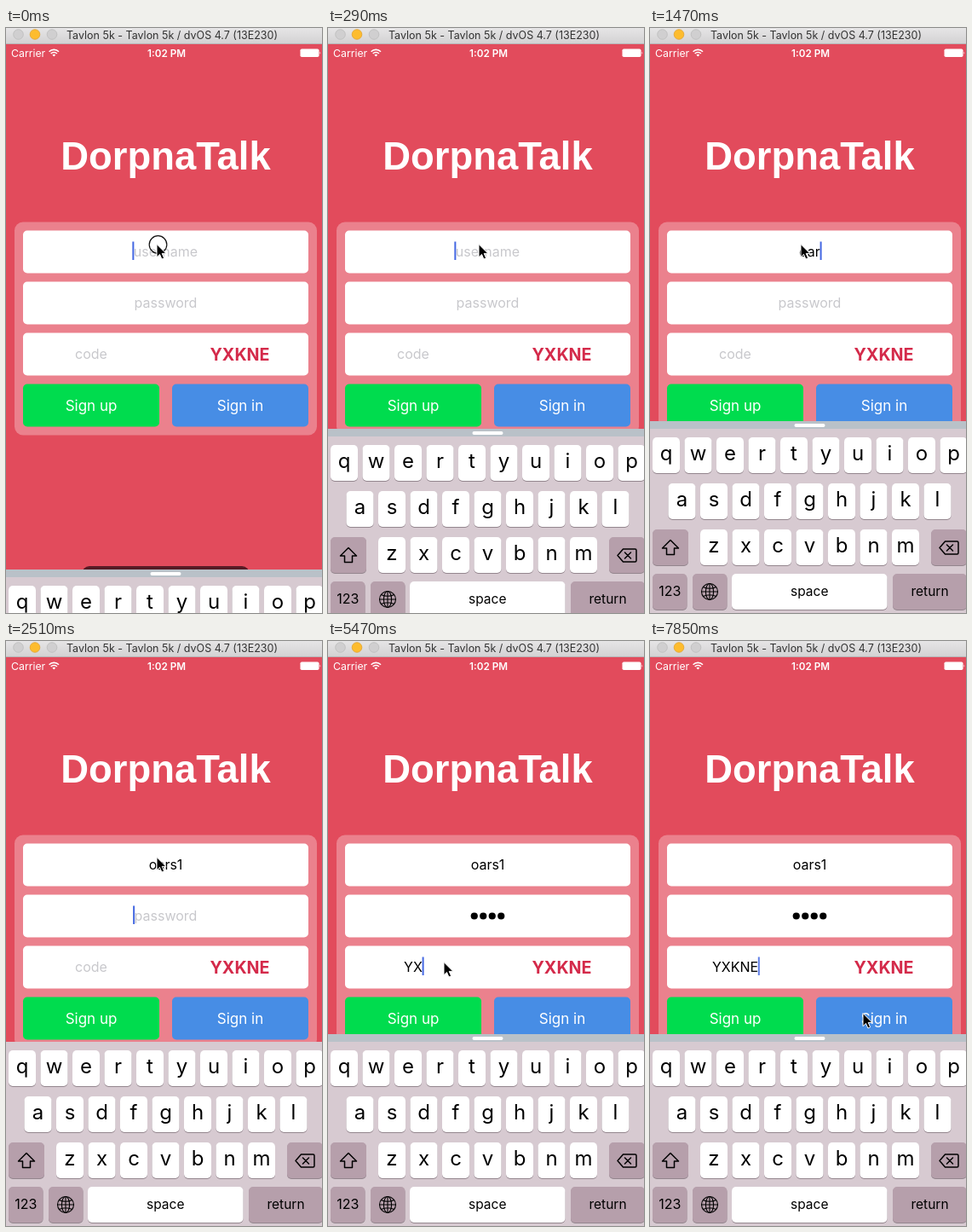
An HTML page for the animation above (8 s loop, 371 by 686 pixels).

```html
<!DOCTYPE html>
<html lang="en">
<head>
<meta charset="utf-8">
<title>Sign-in form</title>
<style>
html, body { margin: 0; width: 100%; height: 100%; overflow: hidden; background: #e24b5c; }
svg { display: block; width: 100%; height: 100%; }
text { font-family: Inter, "Open Sans", sans-serif; }
.mid { text-anchor: middle; }
.hint { fill: #c8c8cc; }
</style>
</head>
<body>
<svg id="stage" viewBox="0 0 371 686">
  <defs>
    <linearGradient id="chrome" x2="0" y2="1">
      <stop offset="0" stop-color="#e6e5e6"/><stop offset="1" stop-color="#d2d1d2"/>
    </linearGradient>
  </defs>
  <rect width="371" height="686" fill="#e24b5c"/>

  <rect width="371" height="19" fill="url(#chrome)"/>
  <rect y="18" width="371" height="1" fill="#b9b4b6"/>
  <g stroke-width=".8">
    <circle cx="14.5" cy="7.5" r="5.8" fill="#d0cfd0" stroke="#bcbbbc"/>
    <circle cx="34" cy="7.5" r="5.8" fill="#fdbc2e" stroke="#e2a12a"/>
    <circle cx="54" cy="7.5" r="5.8" fill="#d0cfd0" stroke="#bcbbbc"/>
  </g>
  <text class="mid" x="195" y="13" font-size="12.5" fill="#333">Tavlon 5k - Tavlon 5k / dvOS 4.7 (13E230)</text>

  <g fill="#fff">
    <text x="6" y="34" font-size="12.3">Carrier</text>
    <text class="mid" x="188.5" y="33.5" font-size="11.7" font-weight="600">1:02 PM</text>
    <path d="M56.3 33.6l-1.9-2a2.8 2.8 0 0 1 3.8 0z"/>
    <path d="M52.7 30a5.1 5.1 0 0 1 7.2 0M50.6 27.7a8.1 8.1 0 0 1 11.4 0" fill="none" stroke="#fff" stroke-width="1.6"/>
    <rect x="345.5" y="24.5" width="22" height="9.5" rx="1.8"/>
    <path d="M368.5 27.5q1.6 1.7 0 3.5z"/>
    <text class="mid" x="187.5" y="166" font-size="45.4" font-weight="700" style="font-family:'Liberation Sans',sans-serif">DorpnaTalk</text>
  </g>

  <rect x="10" y="227.5" width="355" height="250" rx="10" fill="#fff" fill-opacity=".3"/>
  <g fill="#fff">
    <rect x="20" y="237.5" width="335" height="50" rx="5"/>
    <rect x="20" y="297.5" width="335" height="50" rx="5"/>
    <rect x="20" y="357.5" width="335" height="50" rx="5"/>
  </g>
  <rect x="20" y="417.5" width="160" height="50" rx="5" fill="#00dc4e"/>
  <rect x="195" y="417.5" width="160" height="50" rx="5" fill="#478de5"/>
  <g class="mid" font-size="17" fill="#fff">
    <text x="100" y="449">Sign up</text>
    <text x="275" y="449">Sign in</text>
  </g>
  <text class="mid" x="274.5" y="390" font-size="19.7" font-weight="700" fill="#d42a4a">YXKNE</text>
  <g id="fields" class="mid" font-size="16"></g>
  <rect id="caret" width="2" height="21.5" fill="#4468e2"/>

  <rect id="toast" x="89" y="631" width="197" height="40" rx="9" fill="#571b25"/>
  <g id="board">
    <g id="bar">
      <rect y="461" width="371" height="12" fill="#b9c1c8"/>
      <rect x="169.5" y="464" width="36" height="4" rx="2" fill="#fff"/>
    </g>
    <rect y="470" width="371" height="220" fill="#d7cad1"/>
    <g id="keys"></g>
    <g fill="none" stroke="#000" stroke-width="1.5" stroke-linejoin="round" stroke-linecap="round">
      <path d="M24 600.5l-9.5 9.5h5v7.5h9v-7.5h5z"/>
      <path d="M340 609.5l6.5-7.5h14q1.5 0 1.5 1.5v12q0 1.5-1.5 1.5h-14zM348.500 606l7 7m0-7l-7 7"/>
      <g stroke-width="1.1">
        <circle cx="70" cy="661" r="9.5"/>
        <ellipse cx="70" cy="661" rx="4.6" ry="9.500"/>
        <path d="M70 651.500v19M60.500 661h19M62.300 655.500q7.700 3.600 15.400 0M62.300 666.500q7.700-3.600 15.400 0"/>
      </g>
    </g>
  </g>

  <g id="pointer">
    <circle id="ring" cx="2" cy="0.500" r="10.300" fill="none" stroke="#111" stroke-width="1.200"/>
    <path d="M.5 0v15.200l3.500-3.300 2.400 5.600 2.700-1.200-2.400-5.400h4.700z" fill="#000" stroke="#fff" stroke-width="1" stroke-linejoin="round"/>
  </g>
</svg>
<script>
const LOOP = 8000;
const $ = id => document.getElementById(id);

function add(parent, tag, attrs, label = '') {
  const el = document.createElementNS('http://www.w3.org/2000/svg', tag);
  for (const name in attrs) el.setAttribute(name, attrs[name]);
  el.textContent = label;
  parent.appendChild(el);
  return el;
}

function key(x, y, w, label, size = 24, dark = false) {
  const box = { x, width: w, height: 42, rx: 5 };
  add($('keys'), 'rect', { ...box, y: y + 1, fill: '#94868e' });
  add($('keys'), 'rect', { ...box, y, fill: dark ? '#b69fab' : '#fff' });
  add($('keys'), 'text', { class: 'mid', x: x + w / 2, y: y + (size > 20 ? 27 : 26.3), 'font-size': size }, label);
}

[['qwertyuiop', 3, 480], ['asdfghjkl', 21.5, 534], ['zxcvbnm', 59, 588]].forEach(([row, x, y]) =>
  [...row].forEach((ch, i) => key(x + i * 37.5, y, 32, ch)));
key(3, 588, 42, '', 16, true);
key(330, 588, 42, '', 16, true);
key(3, 640, 40.5, '123', 16, true);
key(50, 640, 40.5, '', 16, true);
key(96, 640, 182.5, 'space', 15.5);
key(285, 640, 87, 'return', 15.5, true);

const fields = [
  { x: 187.5, y: 267.5, hint: 'username', value: 'oars1', typed: [1030, 1180, 1470, 1770, 2070] },
  { x: 187.5, y: 327.5, hint: 'password', dots: true, typed: [2660, 2810, 3100, 3400] },
  { x: 100, y: 387.5, hint: 'code', value: 'YXKNE', typed: [4730, 5470, 5920, 6360, 6660] }
];
for (const f of fields) {
  f.text = add($('fields'), 'text', { x: f.x, y: f.y });
  f.bullets = f.dots ? f.typed.map(() => add($('fields'), 'circle', { cy: f.y - 5, r: 4.1 })) : [];
}

// Each track holds [time, value] pairs; a value stays until the next one.
const tracks = {
  rise: [[0, 174], [140, 43], [290, 9], [440, 1], [580, 0]],
  bar: [[0, 0], [2360, 6], [2510, 9.5], [3840, 7], [3990, 2], [4140, 0]],
  focus: [[0, 0], [2360, 1], [3840, 2]],
  caret: [[0, 1], [580, .5], [730, 0], [1030, 1], [4440, .5], [4590, 0], [4730, 1],
    [5170, .5], [5320, 0], [5470, 1], [7100, .5], [7250, 0], [7850, .85]]
};
const at = (track, t) => track.reduce((v, [start, next]) => t >= start ? next : v, 0);

// The pointer advances in small jumps along an eased, slightly bowed line.
const TICK = 148;
function glide(t, start, end, [x0, y0], [x1, y1], bow) {
  const held = Math.floor((t - start + 6) / TICK) * TICK;
  const k = Math.min(1, Math.max(0, held / (end - start)));
  const e = k * k * (3 - 2 * k);
  return [x0 + (x1 - x0) * e, y0 + (y1 - y0) * e - bow * Math.sin(Math.PI * e)];
}
const spots = [[176.5, 253.5], [135.500, 376.500], [249.500, 436.500]];

function drawField(f, t, focused) {
  const n = f.typed.filter(start => t >= start).length;
  const label = n ? (f.dots ? '' : f.value.slice(0, n)) : f.hint;
  if (f.text.textContent !== label) f.text.textContent = label;
  f.text.setAttribute('class', n ? '' : 'hint');
  f.bullets.forEach((dot, i) => {
    dot.setAttribute('cx', f.x + (i - (n - 1) / 2) * 10.5);
    dot.setAttribute('visibility', i < n ? 'visible' : 'hidden');
  });
  if (!focused) return;
  const half = (n && f.dots ? n * 10.5 : f.text.getComputedTextLength()) / 2;
  $('caret').setAttribute('x', n ? f.x + half - .3 : f.x - half - 1.5);
  $('caret').setAttribute('y', f.y - 17);
}

function draw(t) {
  const focus = at(tracks.focus, t);
  fields.forEach((f, i) => drawField(f, t, i === focus));
  $('caret').setAttribute('opacity', at(tracks.caret, t));
  $('board').setAttribute('transform', `translate(0 ${at(tracks.rise, t)})`);
  $('bar').setAttribute('transform', `translate(0 ${at(tracks.bar, t)})`);
  $('toast').setAttribute('visibility', t < 140 ? 'visible' : 'hidden');
  const spot = t < 6000
    ? glide(t, 3400, 3840, spots[0], spots[1], 0)
    : glide(t, 6660, 7550, spots[1], spots[2], 12);
  $('pointer').setAttribute('transform', `translate(${spot})`);
  const pressed = t < 140 || (t >= 3840 && t < 3990);
  $('ring').setAttribute('visibility', pressed ? 'visible' : 'hidden');
}

const began = performance.now();
function tick() {
  draw((performance.now() - began) % LOOP);
  requestAnimationFrame(tick);
}
tick();
</script>
</body>
</html>
```
